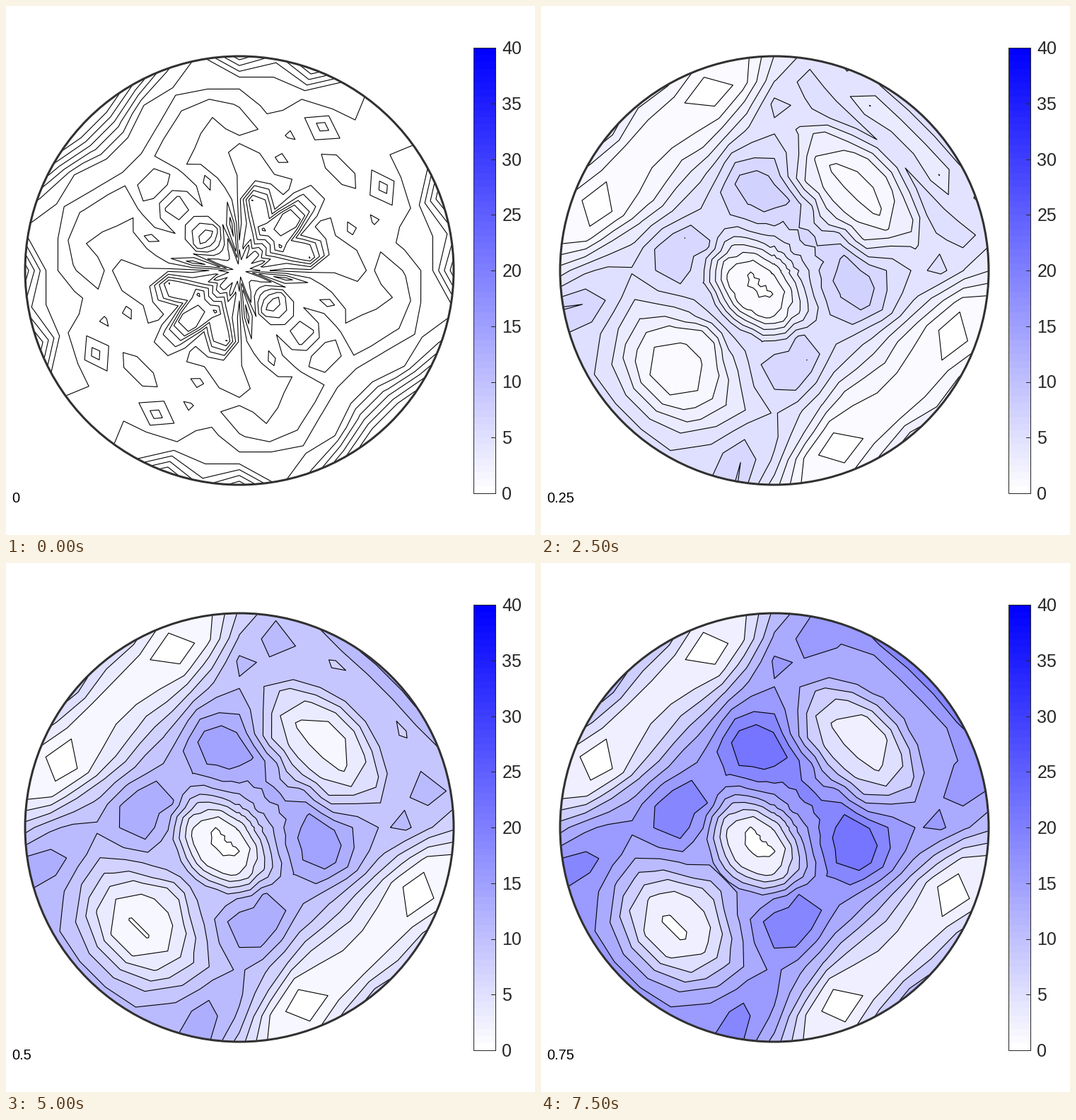
A matplotlib script that plays this animation: 748 by 748 pixels, repeating every 8 s.

```python
import numpy as np
import matplotlib
import matplotlib.pyplot as plt
from matplotlib.animation import FuncAnimation
from matplotlib.colors import ListedColormap
from matplotlib.patches import Circle, Rectangle

SIZE = 748
CX, CY, R = 330, 374, 303
PX = 0.72  # points per pixel at 100 dpi
INK = "#262626"
FRAMES, STEP = 16, 0.05
BANDS = 9
GROWTH = 3.6  # height of one band per unit of time

matplotlib.rcParams["font.family"] = "Liberation Sans"
matplotlib.rcParams["contour.negative_linestyle"] = "solid"

shade = np.linspace(1, 0, 64)
blues = ListedColormap(np.column_stack([shade, shade, np.ones(64)]))

# Polar mesh: 9 rings, one spoke every 10 degrees
ring, spoke = np.mgrid[0:10, 0:37]
rad, angle = ring / 9, np.radians(spoke * 10)
X = CX + R * rad * np.cos(angle)
Y = CY - R * rad * np.sin(angle)

# Coordinates along and across the diagonal axis of symmetry
U = rad * np.cos(angle - np.pi / 4)
V = np.abs(rad * np.sin(angle - np.pi / 4))

# Hills and hollows: centre (u, v), widths (u, v), height early and late
BUMPS = [
    (.56, 0, .21, .36, -4.9, -5.1),      # upper lobe
    (-.65, 0, .26, .34, -4.7, -5.6),     # lower lobe
    (-.12, 0, .18, .25, -5.5, -6.0),     # core
    (.38, .80, .17, .17, -.9, -1.3),     # rim hollows
    (-.38, .80, .17, .17, -.9, -1.3),
    (.20, .35, .17, .15, 2.2, 2.2),      # crests beside the core
    (-.24, .36, .17, .13, 1.7, 1.5),
    (.25, .05, .10, .25, .9, .8),
    (-.31, 0, .08, .22, 2.4, .2),
    (-.75, .54, .18, .18, 1.8, 1.0),     # lower rim crests
    (.98, .20, .10, .40, .2, 1.2),       # upper rim crest
    (.89, .05, .09, .45, -3.2, -1.6),    # slot inside it
    (.72, .10, .09, .32, 2.2, 0),
]


def mirrored(z, *images):
    """Give every spoke the values of the first of its mirror images."""
    a = np.arange(37)
    first = np.min([a % 36, *(f(a) % 36 for f in images)], axis=0)
    return z[:, first]


def flip(a):
    return 9 - a


def opposite(a):
    return a + 18


def flip_opposite(a):
    return 27 - a


def landscape(fade):
    drift = .3 * np.maximum(np.abs(U) - .35, 0)
    z = 6.6 - 5.2 * np.exp(-((V - drift - .8) / .22) ** 2)
    for u, v, su, sv, early, late in BUMPS:
        q = ((U - u) / su) ** 2 + ((V - v) / sv) ** 2
        z += (late + fade * (early - late)) * np.exp(-q ** 1.5)
    z += (.18 + .2 * fade) * ROUGH
    z[0] = z[0].mean()
    z -= z.min()
    return z * BANDS / z.max()


def starting_noise():
    rng = np.random.default_rng(11)
    z = np.abs(rng.normal(0, 1.75, (10, 36)))
    z[2:4] *= 2
    z[1] *= 1.2
    z[0] = 0
    z = mirrored(z, flip, opposite, flip_opposite)
    return z + 5 * np.exp(-((V - 1) / .1) ** 2)


ROUGH = mirrored(np.random.default_rng(3).normal(0, 1, (10, 36)), flip)
ROUGH = ROUGH * np.minimum(1, rad * 3)
NOISE = starting_noise()

fig = plt.figure(figsize=(SIZE / 100, SIZE / 100), dpi=100, facecolor="white")
ax = fig.add_axes([0, 0, 1, 1])
ax.axis("off")


def draw_colorbar():
    ax.imshow(np.arange(64)[::-1, None], cmap=blues, extent=(661, 692, 689, 59),
              interpolation="nearest", aspect="auto")
    ax.add_patch(Rectangle((661, 59), 31, 630, fill=False, ec=INK, lw=PX))
    for v in range(0, 41, 5):
        y = 689 - v / 40 * 630
        ax.plot([686, 692], [y, y], color=INK, lw=PX)
        ax.text(701.5, y + 9, str(v), size=25 * PX, color=INK, va="baseline")


draw_colorbar()
ax.add_patch(Circle((CX, CY), R, fill=False, ec="#303030", lw=3 * PX, zorder=5))
label = ax.text(8.5, 702.5, "0", size=20 * PX, color="black", va="baseline")
drawn = []


def update(i):
    while drawn:
        drawn.pop().remove()
    t = i * STEP
    if i == 0:
        z, levels = NOISE, np.arange(1, 7)
    else:
        fade = np.clip(1 - (t - .1) / .65, 0, 1) ** 1.5
        unit = GROWTH * t
        z = landscape(fade) * unit
        levels = np.arange(BANDS + 1) * unit
        drawn.append(ax.contourf(X, Y, z, levels=levels, extend="both", zorder=1,
                                 colors=blues(np.clip(np.arange(-1, BANDS + 1), 0, BANDS - 1)
                                              * unit / 40)))
    drawn.append(ax.contour(X, Y, z, levels=levels, colors="black",
                            linewidths=1.1 * PX, zorder=2))
    label.set_text(f"{t:.2g}")
    ax.set(xlim=(0, SIZE), ylim=(SIZE, 0))
    return drawn + [label]


anim = FuncAnimation(fig, update, frames=FRAMES, interval=500,
                     repeat=True, repeat_delay=0, blit=False)
plt.show()
```
